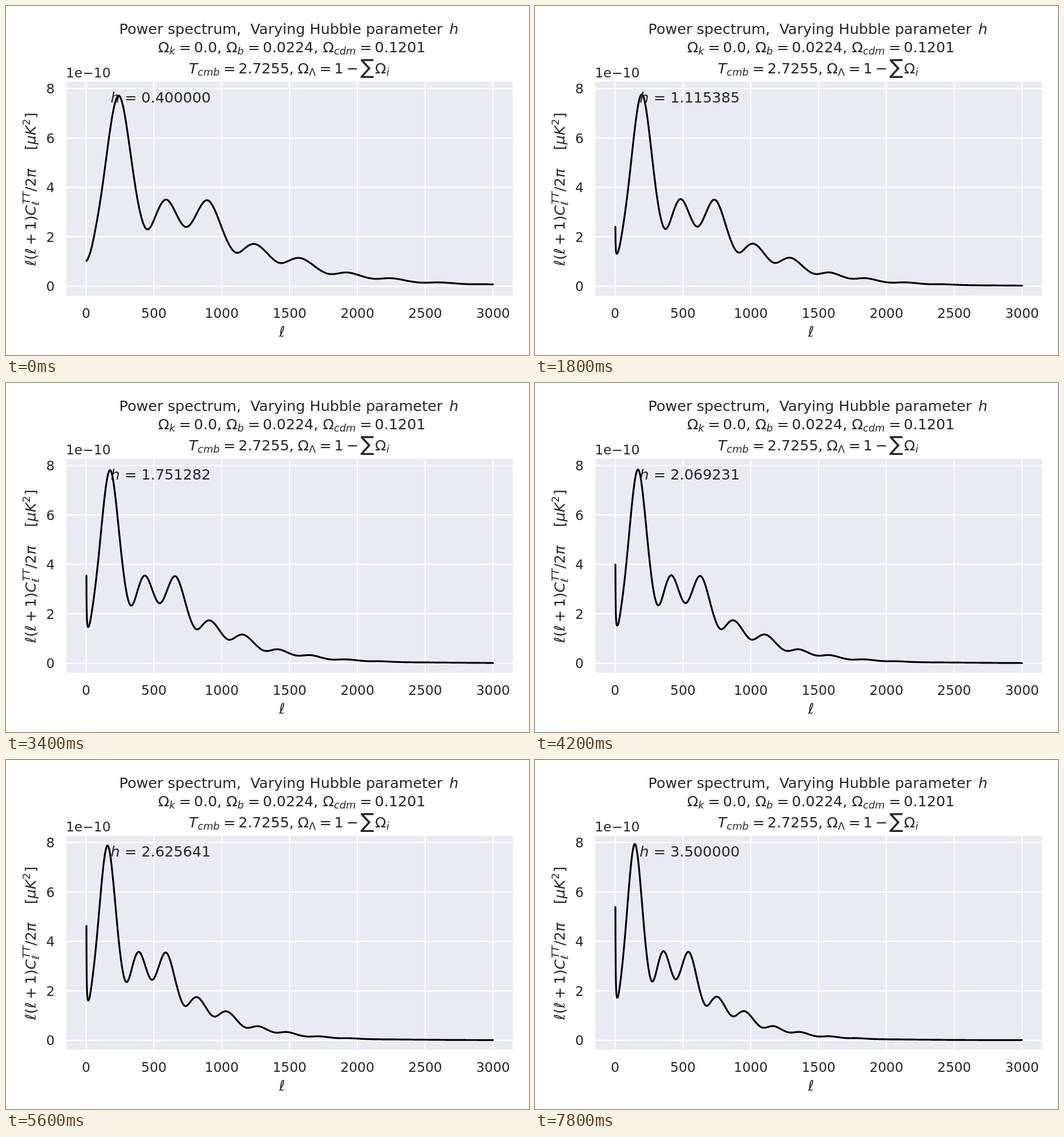
Recreate the animation shown at these times as an HTML page. Size 917 by 611 pixels, loop 8000 ms.

```html
<!DOCTYPE html>
<html lang="en">
<head>
<meta charset="utf-8">
<title>Power spectrum</title>
<style>
  html, body { margin: 0; width: 100%; height: 100%; overflow: hidden; background: #fff; }
  svg { display: block; width: 917px; height: 611px; }
  text { font-family: "DejaVu Sans", sans-serif; fill: #262626; white-space: pre; }
</style>
</head>
<body>
<svg id="stage" viewBox="0 0 917 611"></svg>
<script>
const FRAMES = 40, FRAME_MS = 200, H_MIN = 0.4, H_MAX = 3.5;
const FONT = 25.47, TICK = 23.35, SMALL = 17.83;
const X0 = 140.5, Y0 = 490.6, X_UNIT = 713.4 / 3000, Y_UNIT = 43.27;
const BOX = { left: 105.5, top: 132.6, right: 889, bottom: 507.2 };
const px = l => X0 + l * X_UNIT;
const py = v => Y0 - v * Y_UNIT;

const stage = document.getElementById("stage");

function add(tag, attrs, parent = stage) {
  const el = document.createElementNS("http://www.w3.org/2000/svg", tag);
  for (const key in attrs) el.setAttribute(key, attrs[key]);
  parent.appendChild(el);
  return el;
}

function label(text, x, y, { size = FONT, anchor = "start", italic = false, parent = stage } = {}) {
  const el = add("text", { x, y, "font-size": size, "text-anchor": anchor }, parent);
  if (italic) el.setAttribute("font-style", "italic");
  el.textContent = text;
  return el;
}

const italic = { italic: true };
const script = { size: SMALL, italic: true };

function drawAxes() {
  add("rect", { x: BOX.left, y: BOX.top, width: BOX.right - BOX.left,
    height: BOX.bottom - BOX.top, fill: "#eaeaf2" });
  let grid = "";
  for (let l = 0; l <= 3000; l += 500) {
    grid += `M${px(l)} ${BOX.top}V${BOX.bottom}`;
    label(l, px(l), 546, { size: TICK, anchor: "middle" });
  }
  for (let v = 0; v <= 8; v += 2) {
    grid += `M${BOX.left} ${py(v)}H${BOX.right}`;
    label(v, 85.3, py(v) + 8.8, { size: TICK, anchor: "end" });
  }
  add("path", { d: grid, stroke: "#fff", "stroke-width": 2.12 });
  label("1e−10", 105, 125, { size: TICK });
  label("ℓ", 484, 579, { anchor: "middle" });
}

function drawTitle() {
  label("Power spectrum,  Varying Hubble parameter ", 198.5, 49);
  label("h", 777.2, 49, italic);

  const term = (x, sub, subX, eqX, numX, value) => {
    label("Ω", x, 81);
    label(sub, subX, 85.2, script);
    label("=", eqX, 81);
    label(value, numX, 81);
  };
  term(266.7, "k", 286.2, 303.3, 329.6, "0.0,");
  term(386.3, "b", 405.8, 423.9, 450.2, "0.0224,");
  term(555.5, "cdm", 575, 620.3, 646.6, "0.1201");

  label("T", 320.5, 118, italic);
  label("cmb", 336.1, 122.2, script);
  [["=", 381.2], ["2.7255,", 407.5], ["Ω", 511.5], ["=", 549.5], ["1", 575.5], ["−", 596.5], ["Ω", 647]]
    .forEach(([text, x]) => label(text, x, 118));
  label("Λ", 531, 122.2, { size: SMALL });
  label("∑", 621.5, 119, { size: 36 });
  label("i", 667, 122.2, script);
}

function drawYLabel() {
  const parent = add("g", { transform: "translate(52 455) rotate(-90)" });
  const put = (text, x, y = 0, style = {}) => label(text, x, y, { ...style, parent });
  put("ℓ(ℓ", 0);
  put("+", 35.9);
  put("1)", 62.2);
  put("C", 88.3, 0, italic);
  put("TT", 108, -10.5, script);
  put("ℓ", 106, 5.5, { size: SMALL });
  put("/2", 130);
  put("π", 154.8, 0, italic);
  put("[", 202.7);
  put("μK", 212.6, 0, italic);
  put("2", 246, -9.6, { size: SMALL });
  put("]", 258.4);
}

// Natural cubic spline through [x, y] points.
function spline(points) {
  const n = points.length - 1;
  const gap = i => points[i + 1][0] - points[i][0];
  const slope = i => (points[i + 1][1] - points[i][1]) / gap(i);
  const c = [0], d = [0], m = Array(n + 1).fill(0);
  for (let i = 1; i < n; i++) {
    const w = 2 * (gap(i - 1) + gap(i)) - gap(i - 1) * c[i - 1];
    c[i] = gap(i) / w;
    d[i] = (6 * (slope(i) - slope(i - 1)) - gap(i - 1) * d[i - 1]) / w;
  }
  for (let i = n - 1; i > 0; i--) m[i] = d[i] - c[i] * m[i + 1];
  return x => {
    let i = 0;
    while (i < n - 1 && x > points[i + 1][0]) i++;
    const g = gap(i), t = x - points[i][0];
    return points[i][1] + t * (slope(i) - g * (2 * m[i] + m[i + 1]) / 6
      + t * (m[i] / 2 + t * (m[i + 1] - m[i]) / (6 * g)));
  };
}

// Acoustic peaks at the lowest h, in stage pixels.
const peaks = spline([
  [140.5, 449.3], [143.5, 442.7], [148.5, 429], [155, 400], [162, 361.5], [168.8, 317.5],
  [180.5, 231], [198, 157], [214.5, 231], [227, 317.5], [247.5, 391], [263.5, 364.5],
  [280.5, 339], [298, 363], [316, 387], [334.5, 363], [353, 340], [377.5, 386],
  [404, 432], [419, 424], [434.5, 416.5], [459, 434], [481, 450], [497, 445.5],
  [513.5, 441], [541, 455.5], [566, 469], [596, 466.5], [621, 472], [645, 477.5],
  [673, 476.5], [701, 480.6], [728, 484.3], [755, 483.9], [810, 487], [838, 487.1],
  [870, 488.1], [948, 489.2], [1062, 489.9], [1320, 490.4]
]);

// Distance to last scattering for a flat universe with fixed matter density.
function distance(h) {
  const matter = 0.1425, ratio = (h * h - matter) / matter, steps = 200;
  let sum = 0;
  for (let i = 0; i < steps; i++) sum += 1 / Math.sqrt(1 + ratio * ((i + 0.5) / steps) ** 6);
  return 2 * sum / steps - 0.0693;
}

function curve(h) {
  const scale = distance(h) / distance(H_MIN), q = 1 - scale;
  const gain = 1 + 0.0084 * (h - H_MIN);
  const lowEnd = 0.06 + q * q * (60.3 - 117.6 * q + 89 * q * q);
  const points = [];
  for (let l = 2; l <= 3000; l += l < 60 ? 1 : 3) {
    const base = (Y0 - peaks(px(l / scale))) / Y_UNIT;
    const value = gain * base + lowEnd * (2 / l) ** 1.17;
    points.push(px(l).toFixed(2) + " " + py(value).toFixed(2));
  }
  return "M" + points.join("L");
}

drawAxes();
drawTitle();
drawYLabel();
const line = add("path", { fill: "none", stroke: "#000", "stroke-width": 3.18,
  "stroke-linecap": "round", "stroke-linejoin": "round" });
label("h", 183.6, 168.5, italic);
const readout = label("", 199.8, 168.5);

let shown = -1;
function render(time) {
  const step = Math.floor(time / FRAME_MS) % FRAMES;
  if (step === shown) return;
  shown = step;
  const h = H_MIN + (H_MAX - H_MIN) * step / (FRAMES - 1);
  line.setAttribute("d", curve(h));
  readout.textContent = " = " + h.toFixed(6);
}

const start = performance.now();
function tick() {
  render(performance.now() - start);
  requestAnimationFrame(tick);
}
tick();
</script>
</body>
</html>
```
